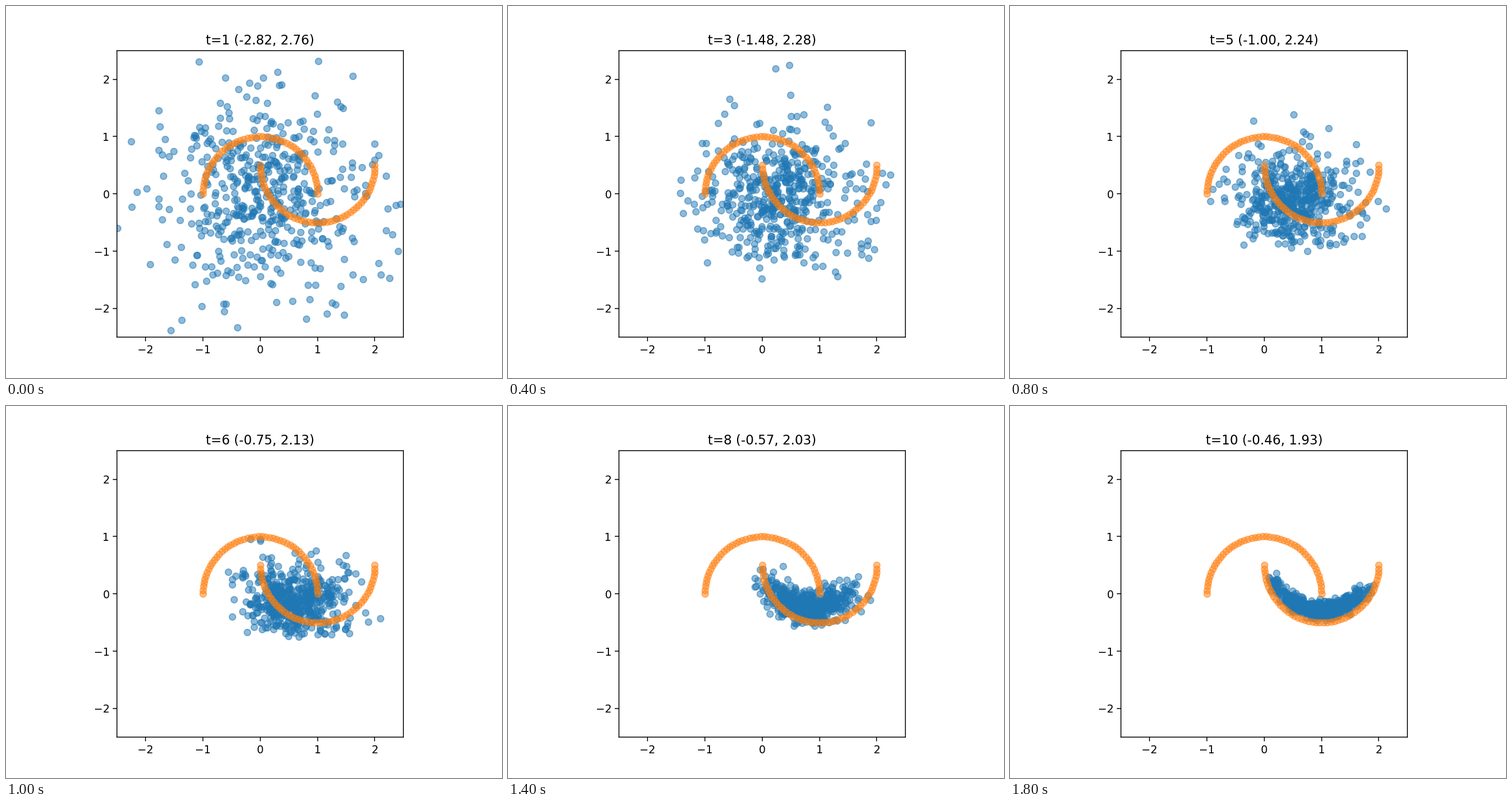
These frames come from a looping animation (864x648 px, 2000 ms). A matplotlib script:

```python
import numpy as np
import matplotlib.pyplot as plt
from matplotlib.animation import FuncAnimation

STEPS = 10
COUNT = 500

# Smallest and largest coordinate at each step, as read out in the title
LOWS = [-2.82, -2.39, -1.48, -1.42, -1.00, -0.75, -0.70, -0.57, -0.49, -0.46]
HIGHS = [2.76, 2.34, 2.28, 2.18, 2.24, 2.13, 2.13, 2.03, 2.00, 1.93]

rng = np.random.default_rng(11)

# Noise: Gaussian with slightly heavy tails, slowly wandering in angle
radius = rng.rayleigh(0.93, COUNT) * rng.lognormal(0, 0.15, COUNT)
angle = rng.uniform(0, 2 * np.pi, COUNT)
wander = np.cumsum(rng.normal(0, 0.25, (STEPS, COUNT)), axis=0)

# Each particle ends in a band along the inside of the lower moon
bend = 1.45 + 0.25 * radius * np.cos(angle) + rng.normal(0, 0.55, COUNT)
bend = np.where((bend > 0.2) & (bend < 2.75),
                bend, rng.uniform(0.25, 2.7, COUNT))
inset = 0.34 * rng.beta(1.7, 1.7, COUNT) * (0.4 + 0.6 * np.sin(bend))


def moon_point(a, r=1.0):
    return np.column_stack([1 - r * np.cos(a), 0.5 - r * np.sin(a)])


goal = moon_point(bend, 0.96 - inset)


def cloud(step):
    progress = step / (STEPS - 1)
    pull = 1 - (1 - progress) ** 1.2
    spread = 0.03 + 0.97 * (1 - progress) ** 1.4
    turn = angle + wander[step]
    noise = radius[:, None] * np.column_stack([np.cos(turn),
                                               0.92 * np.sin(turn)])
    points = pull * goal + spread * noise
    low, high = LOWS[step], HIGHS[step]
    # Draw particles beyond the range back towards their goal
    outside = ((points < low) | (points > high)).any(axis=1)
    points[outside] -= 0.4 * spread * noise[outside]
    return np.clip(points, low, high)


def moons(n=50):
    a = np.linspace(0, np.pi, n)
    upper = np.column_stack([np.cos(a), np.sin(a)])
    return np.vstack([upper, moon_point(a)])


plt.rcParams["path.snap"] = False
fig, ax = plt.subplots(figsize=(6.4, 4.8), dpi=135)
ax.set_aspect("equal")
ax.set(xlim=(-2.5, 2.5), ylim=(-2.5, 2.5),
       xticks=range(-2, 3), yticks=range(-2, 3))

particles = ax.scatter(*cloud(0).T, color="C0", alpha=0.5)
ax.scatter(*moons().T, color="C1", alpha=0.5)
title = ax.set_title("")


def update(step):
    particles.set_offsets(cloud(step))
    title.set_text(f"t={step + 1} ({LOWS[step]:.2f}, {HIGHS[step]:.2f})")
    return particles, title


anim = FuncAnimation(fig, update, frames=STEPS, interval=200,
                     repeat=True, repeat_delay=0, blit=False)
plt.show()
```
